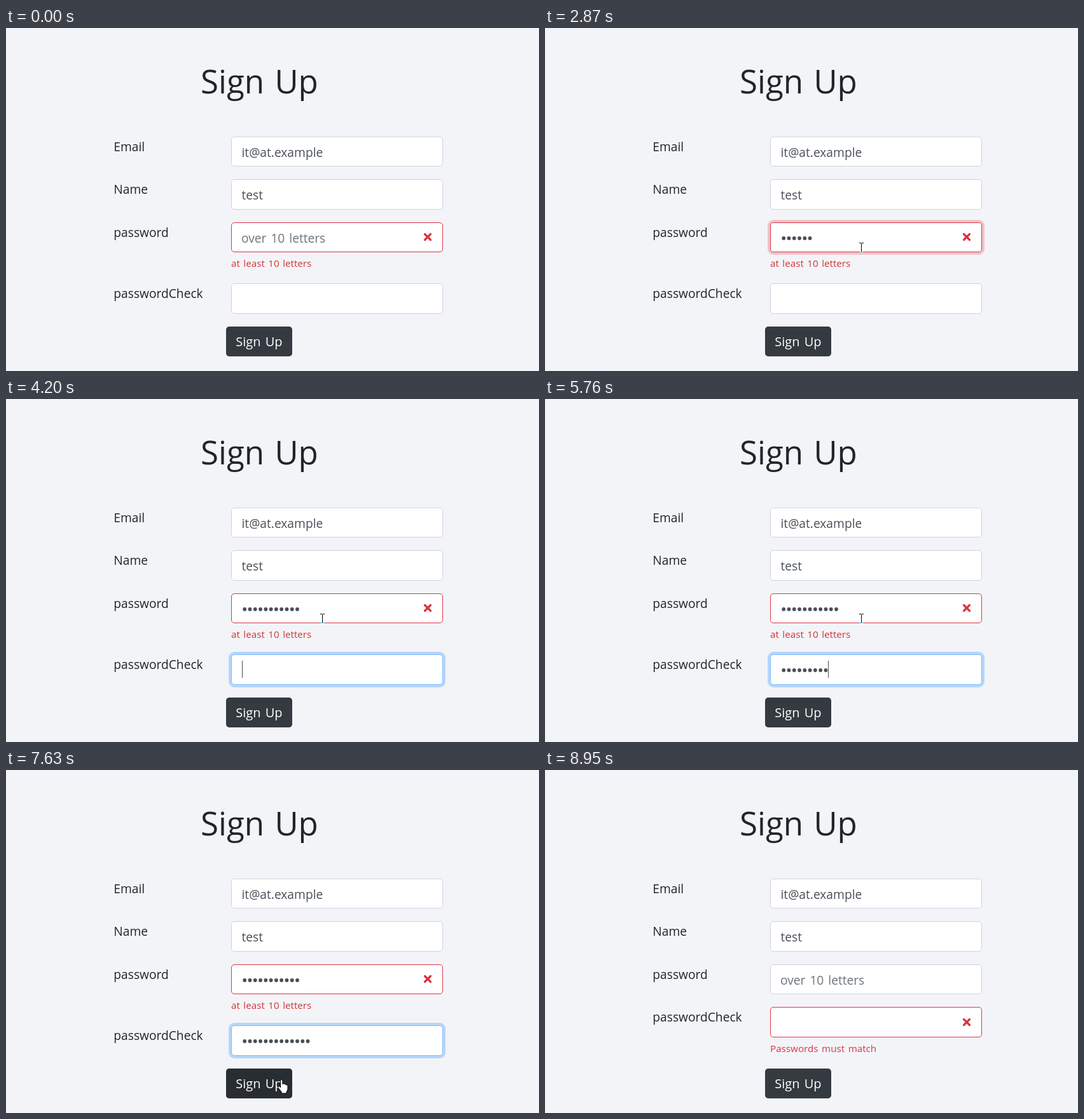
An HTML page that plays this animation: 838x540 px, repeating every 9580 ms.

```html
<!DOCTYPE html>
<html lang="en">
<head>
<meta charset="utf-8">
<title>Sign Up</title>
<style>
  html, body { margin: 0; width: 100%; height: 100%; overflow: hidden; background: #f3f4f8; }
  svg { display: block; }
  text { font: 19.2px "Open Sans", "Noto Sans", sans-serif; word-spacing: 2px; fill: #212529; }
  .title { font-size: 51px; word-spacing: 3px; }
  .value { fill: #495057; }
  .hint { fill: #6c757d; }
  .error { font-size: 15.2px; word-spacing: 1.6px; fill: #cf3535; }
  .button { font-size: 20px; font-weight: 500; fill: #fff; }
  .field { fill: #fff; stroke: #ced4da; }
  .bad { stroke: #dc3545; }
  .ring { fill: none; stroke-width: 4; }
  .cross { fill: none; stroke: #d9343c; stroke-width: 3.2; stroke-linecap: round; }
  .dots { fill: #495057; }
  .pointer { fill: #fff; stroke: #000; stroke-linejoin: round; }
</style>
</head>
<body>
<svg width="838" height="540" viewBox="0 0 838 540">
  <defs>
    <path id="cross" class="cross" d="M658.5 324.5l9 9m0-9l-9 9"/>
  </defs>
  <text class="title" x="306" y="102.5">Sign Up</text>

  <text x="169.3" y="194">Email</text>
  <rect class="field" x="354.5" y="171.5" width="332" height="46" rx="4.5"/>
  <text class="value" x="370.5" y="203">it@at.example</text>

  <text x="169.3" y="261">Name</text>
  <rect class="field" x="354.5" y="238.5" width="332" height="47" rx="4.5"/>
  <text class="value" x="370.5" y="270">test</text>

  <text x="169.3" y="329">password</text>
  <rect id="passRing" class="ring" stroke="#dc3545" x="352" y="304" width="337" height="51" rx="7"/>
  <rect id="passBox" class="field" x="354.5" y="306.5" width="332" height="46" rx="4.5"/>
  <text id="hint" class="hint" x="370" y="338">over 10 letters</text>
  <g id="passDots" class="dots"></g>
  <g id="shortError">
    <use href="#cross"/>
    <text class="error" x="354" y="376">at least 10 letters</text>
  </g>

  <g id="checkRow">
    <text x="169.3" y="425">passwordCheck</text>
    <rect id="checkRing" class="ring" stroke="#007bff" x="352" y="400" width="337" height="52" rx="7"/>
    <rect id="checkBox" class="field" x="354.5" y="402.5" width="332" height="47" rx="4.5"/>
    <rect id="checkEdge" fill="none" stroke="#80bdff" x="354.5" y="402.5" width="332" height="47" rx="4.5"/>
    <g id="checkDots" class="dots"></g>
    <g id="matchError">
      <use href="#cross" y="97"/>
      <text class="error" x="354" y="473" style="fill:#dc3545">Passwords must match</text>
    </g>
  </g>

  <rect id="buttonRing" class="ring" stroke="#52585d" x="344" y="468" width="108" height="51" rx="7"/>
  <rect x="346" y="470" width="104" height="47" rx="5" fill="#343a40"/>
  <rect id="hover" x="346" y="470" width="104" height="47" rx="5" fill="#23272b"/>
  <text class="button" x="361.3" y="501">Sign Up</text>

  <rect id="caret" width="1" height="27" fill="#495057"/>
  <g id="cursor">
    <g id="beam">
      <path d="M-3 -6.5H0M1 -6.5H4M.5 -6V7" fill="none" stroke="#000"/>
      <path d="M-3 7.5H4" stroke="#35c9cf"/>
    </g>
    <path id="arrow" class="pointer" d="M.5 .5V16.8L4.2 13.3L6.8 19.2L9.2 18.2L6.7 12.3H11.8Z"/>
    <path id="hand" class="pointer" transform="translate(-5 0)"
      d="M4.5 13V2.2a1.7 1.7 0 0 1 3.4 0V7.5l1-.6a1.6 1.6 0 0 1 2.4 1l.4 .2a1.6 1.6 0 0 1 2.3 1a1.5 1.5 0 0 1 2 1.6V15q0 2.5-2 4.5V22H6.2V20L1 13.2a1.6 1.6 0 0 1 2.4-2Z"/>
  </g>
</svg>
<script>
const LOOP = 9580, RELOAD = 7880, STEP = 8.28;
const $ = id => document.getElementById(id);
const ramp = (t, a, b) => Math.min(1, Math.max(0, (t - a) / (b - a)));
const fade = (t, start) => ramp(t, start, start + 140);
const show = (id, on) => $(id).style.display = on ? "" : "none";
const alpha = (id, value) => $(id).style.opacity = value;
const within = (t, a, b) => t >= a && t < b;

const passKeys = [1700, 1820, 1950, 2070, 2200, 2320, 2940, 3260, 3390, 3520, 3650];
const checkKeys = [4360, 4480, 4610, 4730, 4860, 4980, 5310, 5490, 5680, 5860, 6050, 6230, 6460];

// time, x, y, easing power towards this point
const path = [
  [450, 510, 409, 1], [660, 497, 345, 1], [7020, 497, 345, 1], [7320, 481, 486, 1],
  [7400, 481, 486, 1], [7610, 432, 487, 1], [8490, 432, 487, 1], [8950, 684, 542, 2]
];

function makeDots(id, keys, y) {
  $(id).innerHTML = keys.map((_, i) =>
    `<circle cx="${(375.2 + i * STEP).toFixed(2)}" cy="${y}" r="2.9"/>`).join("");
}

function typed(id, keys, t) {
  const count = t < RELOAD ? keys.filter(k => k <= t).length : 0;
  [...$(id).children].forEach((dot, i) => dot.style.display = i < count ? "" : "none");
  return count;
}

function pointAt(t) {
  const i = Math.max(1, path.findIndex(p => p[0] > t));
  const [t0, x0, y0] = path[i - 1], [t1, x1, y1, power] = path[i];
  const k = ramp(t, t0, t1) ** power;
  return [x0 + (x1 - x0) * k, y0 + (y1 - y0) * k];
}

function drawCursor(t) {
  const visible = within(t, 450, 8950);
  show("cursor", visible);
  if (!visible) return;
  const [x, y] = pointAt(t).map(Math.round);
  const onField = x < 687 && (within(y, 306, 353) || within(y, 402, 450));
  const onButton = within(x, 346, 450) && within(y, 470, 517);
  $("cursor").setAttribute("transform", `translate(${x} ${y})`);
  show("beam", onField);
  show("hand", onButton);
  show("arrow", !onField && !onButton);
}

function draw(t) {
  const reloaded = t >= RELOAD;
  const passCount = typed("passDots", passKeys, t);
  const checkCount = typed("checkDots", checkKeys, t);
  const blue = reloaded ? 0 : fade(t, 4060) - fade(t, 7720);

  show("hint", !passCount);
  show("shortError", !reloaded);
  show("matchError", reloaded);
  $("passBox").classList.toggle("bad", !reloaded);
  $("checkBox").classList.toggle("bad", reloaded);
  $("checkRow").setAttribute("transform", `translate(0 ${reloaded ? -29 : 0})`);

  alpha("passRing", .25 * (fade(t, 810) - fade(t, 4060)));
  alpha("checkRing", .25 * blue);
  alpha("checkEdge", blue);
  alpha("buttonRing", reloaded ? 0 : .5 * fade(t, 7720));
  alpha("hover", reloaded ? ramp(t, 8490, 8600) - fade(t, 8610) : fade(t, 7540));

  const inCheck = t >= 4060;
  show("caret", within(t, 810, 1320) || within(t, 1700, 2870) || within(t, 2940, 7020));
  $("caret").setAttribute("x", Math.floor(371 + STEP * (inCheck ? checkCount : passCount)));
  $("caret").setAttribute("y", inCheck ? 412 : 316);
  drawCursor(t);
}

makeDots("passDots", passKeys, 331);
makeDots("checkDots", checkKeys, 427);

const start = performance.now();
function tick() {
  draw((performance.now() - start) % LOOP);
  requestAnimationFrame(tick);
}
tick();
</script>
</body>
</html>
```
